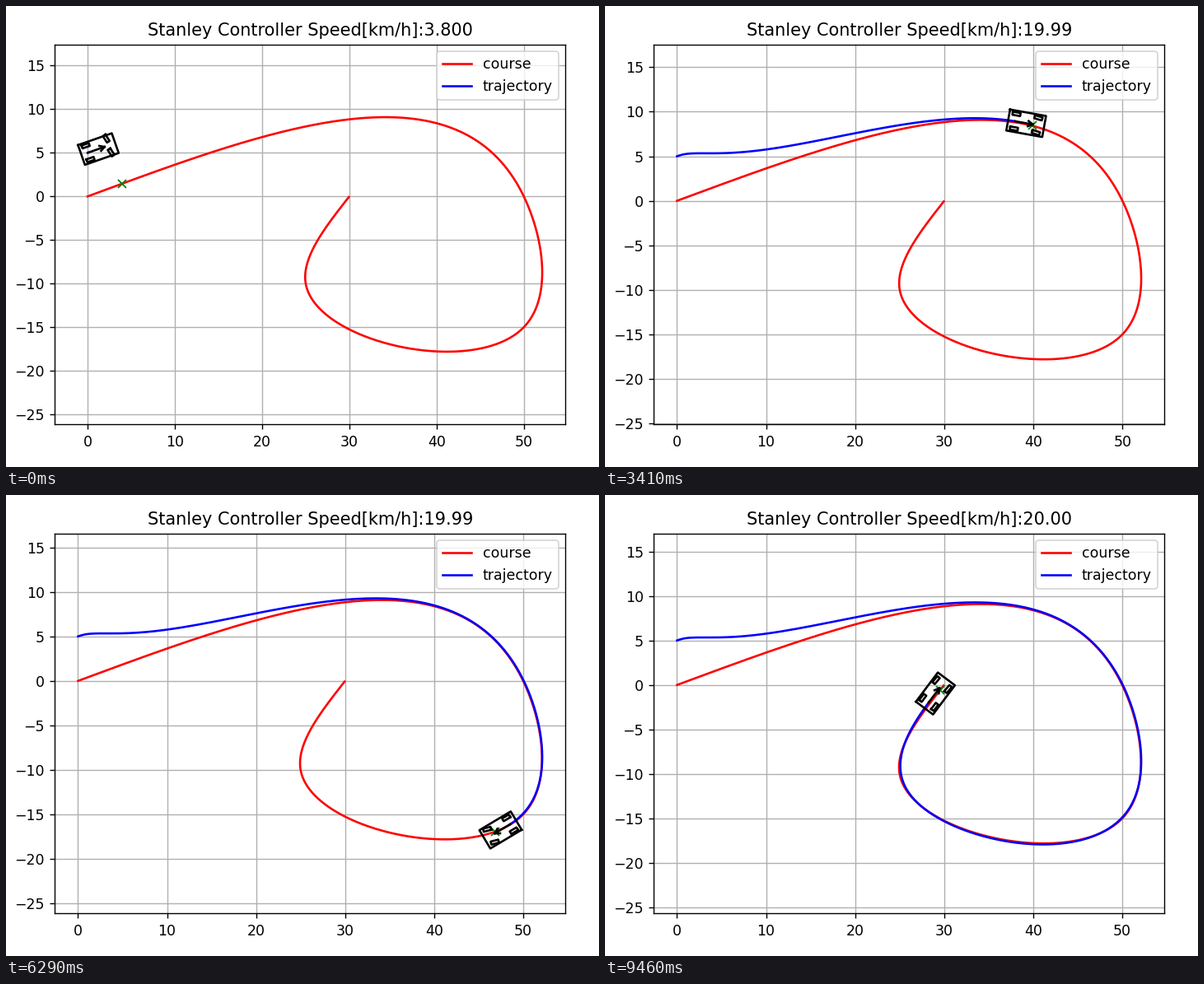
Write a matplotlib script that moves like this. It is 720 px wide and 560 px high and loops after 9520 ms.

```python
import numpy as np
import matplotlib.pyplot as plt
from matplotlib.animation import FuncAnimation

W, H, DPI = 720, 560, 125
LOOP, INTERVAL = 9520, 40

# controller and vehicle
DT, GAIN, KP = 0.1, 0.5, 1.0
MAX_STEER = np.radians(30)
TARGET_SPEED = 20 / 3.6
WHEELBASE, FRONT, BACK, WIDTH = 2.5, 3.3, 0.8, 2.4
TRACK, TIRE_R, TIRE_W = 0.7 * 2.4, 0.44, 0.7


def natural_spline(t, v, q):
    """Value and slope at q of the natural cubic spline through (t, v)."""
    h, n = np.diff(t), len(t)
    slope = np.diff(v) / h
    a, b = np.eye(n), np.zeros(n)
    for i in range(1, n - 1):
        a[i, i - 1:i + 2] = h[i - 1], 2 * (h[i - 1] + h[i]), h[i]
        b[i] = 6 * (slope[i] - slope[i - 1])
    m = np.linalg.solve(a, b)
    i = np.clip(np.searchsorted(t, q, side="right") - 1, 0, n - 2)
    u = q - t[i]
    c1 = slope[i] - h[i] * (2 * m[i] + m[i + 1]) / 6
    c3 = (m[i + 1] - m[i]) / (6 * h[i])
    value = v[i] + u * (c1 + u * (m[i] / 2 + u * c3))
    return value, c1 + u * (m[i] + 3 * u * c3)


def make_course():
    px = np.array([0.0, 50, 50, 25, 30])
    py = np.array([0.0, 0, -15, -10, 0])
    t = np.r_[0, np.cumsum(np.hypot(np.diff(px), np.diff(py)))]
    q = np.arange(0, t[-1], 0.1)
    x, dx = natural_spline(t, px, q)
    y, dy = natural_spline(t, py, q)
    return x, y, np.arctan2(dy, dx)


def wrap(angle):
    return (angle + np.pi) % (2 * np.pi) - np.pi


def simulate(cx, cy, cyaw):
    """Rows of x, y, yaw, speed, steer, target index; row 0 is the start."""
    x, y, yaw, v, target = 0.0, 5.0, np.radians(20), 0.0, 0
    rows = [(x, y, yaw, v, 0.0, 0)]
    while len(rows) < 400:
        dx = x + WHEELBASE * np.cos(yaw) - cx
        dy = y + WHEELBASE * np.sin(yaw) - cy
        near = int(np.argmin(np.hypot(dx, dy)))
        error = dx[near] * np.sin(yaw) - dy[near] * np.cos(yaw)
        target = max(target, near)
        if target == len(cx) - 1:
            break
        steer = wrap(cyaw[target] - yaw) + np.arctan2(GAIN * error, v)
        turn = np.tan(np.clip(steer, -MAX_STEER, MAX_STEER))
        x += v * np.cos(yaw) * DT
        y += v * np.sin(yaw) * DT
        yaw = wrap(yaw + v / WHEELBASE * turn * DT)
        v += KP * (TARGET_SPEED - v) * DT
        rows.append((x, y, yaw, v, steer, target))
    return rows


def rotate(points, angle):
    c, s = np.cos(angle), np.sin(angle)
    return np.array([[c, -s], [s, c]]) @ points


def box(x0, x1, half):
    return np.array([[x0, x0, x1, x1, x0], [half, -half, -half, half, half]])


def car_parts(x, y, yaw, steer):
    tire = box(-TIRE_R, TIRE_R, TIRE_W / 4)
    parts = [box(-BACK, FRONT, WIDTH / 2)]
    for axle, angle in ((WHEELBASE, steer), (0, 0)):
        for side in (-1, 1):
            parts.append(rotate(tire, angle) + [[axle], [side * TRACK / 2]])
    tip = 0.8 * WHEELBASE
    barb = 0.3 * tip
    bx, by = tip - barb * np.cos(np.pi / 6), barb * np.sin(np.pi / 6)
    parts.append(np.array([[0, tip], [0, 0]]))
    parts.append(np.array([[tip, bx], [0, by]]))
    parts.append(np.array([[tip, bx], [0, -by]]))
    return [rotate(p, yaw) + [[x], [y]] for p in parts]


cx, cy, cyaw = make_course()
states = simulate(cx, cy, cyaw)
path = np.array([s[:2] for s in states])
last = len(states) - 1

# playback pace: step number at some times, and pauses in the display
KEY_TIMES = [0, 1960, 3410, 5230, 6290, 8150, 9450]
KEY_STEPS = [2, 49, 79, 116, 139, 176, last]
PAUSES = [(600, 750), (1000, 1150), (1600, 1760), (2710, 2810),
          (3820, 3970), (4720, 4870), (8700, 8800)]


def step_at(ms):
    for start, end in PAUSES:
        if start < ms < end:
            ms = start
    return min(last, int(round(np.interp(ms, KEY_TIMES, KEY_STEPS))))


fig = plt.figure(figsize=(W / DPI, H / DPI), dpi=DPI, facecolor="white")
ax = fig.add_axes([59.25 / W, 51.6 / H, 620 / W, 461.85 / H])
ax.plot(cx, cy, "-r", label="course")
trail, = ax.plot([], [], "-b", label="trajectory")
mark, = ax.plot([], [], "xg")
car = [ax.plot([], [], color="black")[0] for _ in range(8)]
ax.axis("equal")
ax.grid(True)
ax.legend(loc="upper right")
title = ax.set_title("")


def update(i):
    n = step_at(i * INTERVAL + (10 if i else 0))
    x, y, yaw, v, steer, target = states[n]
    trail.set_data(path[:n + 1, 0], path[:n + 1, 1])
    mark.set_data([cx[target]], [cy[target]])
    for line, part in zip(car, car_parts(x, y, yaw, steer)):
        line.set_data(part[0], part[1])
    title.set_text("Stanley Controller Speed[km/h]:" + f"{v * 3.6:.6f}"[:5])
    ax.relim()
    ax.autoscale_view()
    return [trail, mark, title, *car]


anim = FuncAnimation(fig, update, frames=LOOP // INTERVAL, interval=INTERVAL,
                     init_func=lambda: update(0), repeat=True, repeat_delay=0)
plt.show()
```
